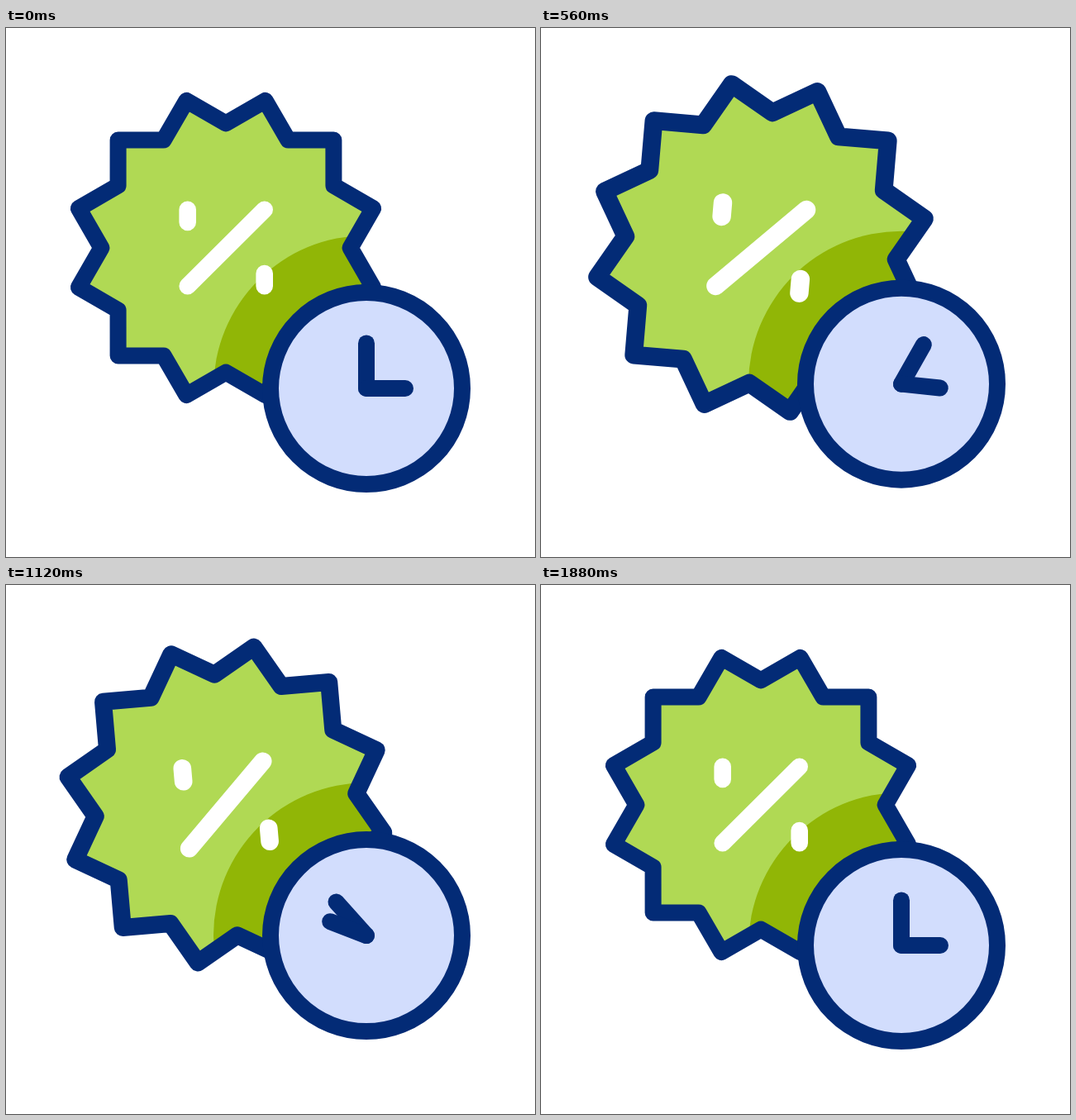
An HTML page with a canvas for the animation above (1.92 s loop, 640 by 640 pixels).

```html
<!DOCTYPE html>
<html lang="en">
<head>
<meta charset="utf-8">
<title>Limited time discount</title>
<style>
html, body { margin: 0; width: 100%; height: 100%; overflow: hidden; background: #fff; }
canvas { display: block; width: 640px; height: 640px; }
</style>
</head>
<body>
<canvas id="stage" width="640" height="640"></canvas>
<script>
const ctx = document.getElementById('stage').getContext('2d');
const NAVY = '#032b76', LIME = '#b0d954', OLIVE = '#91b606', ICE = '#d2ddfd';
const STEP = 40, STEPS = 48, TAU = Math.PI * 2, DEG = Math.PI / 180;

// Symmetric cubic Bezier easing with handles at (0.55, 0) and (0.45, 1)
function ease(u) {
  if (u <= 0) return 0;
  if (u >= 1) return 1;
  let lo = 0, hi = 1, s = 0.5;
  for (let i = 0; i < 30; i++) {
    s = (lo + hi) / 2;
    const r = 1 - s;
    const x = 3 * r * r * s * 0.55 + 3 * r * s * s * 0.45 + s * s * s;
    if (x < u) lo = s; else hi = s;
  }
  return s * s * (3 - 2 * s);
}

// Value at time t along eased [time, value] keys
function track(t, keys) {
  let value = keys[0][1];
  for (let i = 1; i < keys.length; i++) {
    const [t0, v0] = keys[i - 1], [t1, v1] = keys[i];
    if (t >= t0) value = v0 + (v1 - v0) * ease((t - t0) / (t1 - t0));
  }
  return value;
}

const TURN = [[0, 0], [9.6, 6.15], [25.9, -5.2], [37.5, 0]];
const SCALE = [[0, 1], [18.75, 1.1], [37.5, 1]];
const LIFT = [[5.4, 0], [24, 12.8], [42.2, 0]];
const MINUTE = [[7.2, 0], [35.9, 360]];
const HOUR = [[10.1, 90], [44.1, 450]];

const star = new Path2D();
for (let i = 0; i < 24; i++) {
  const r = i % 2 ? 184.4 : 150.6, a = i * 15 * DEG;
  star.lineTo(r * Math.sin(a), -r * Math.cos(a));
}
star.closePath();

const percent = new Path2D('M-46.3 46.3L46.7-46.3M-46.3-46.3V-31M46.7 31V46.3');

function disc(x, y, r) {
  ctx.beginPath();
  ctx.arc(x, y, r, 0, TAU);
}

function placeBadge(t) {
  const k = track(t, SCALE);
  ctx.translate(266, 266);
  ctx.rotate(track(t, TURN) * DEG);
  ctx.scale(k, k);
}

function drawBadge(t, clockY) {
  ctx.save();
  placeBadge(t);
  ctx.fillStyle = LIME;
  ctx.fill(star);
  ctx.clip(star);
  ctx.resetTransform();
  ctx.fillStyle = OLIVE;
  disc(436, clockY, 185);
  ctx.fill();
  ctx.restore();

  ctx.save();
  placeBadge(t);
  ctx.lineWidth = 20;
  ctx.strokeStyle = NAVY;
  ctx.stroke(star);
  ctx.lineWidth = 20.6;
  ctx.strokeStyle = '#fff';
  ctx.stroke(percent);
  ctx.restore();
}

function drawHand(y, length, angle) {
  ctx.beginPath();
  ctx.moveTo(436, y);
  ctx.lineTo(436 + length * Math.sin(angle * DEG), y - length * Math.cos(angle * DEG));
  ctx.stroke();
}

function drawClock(t, y) {
  ctx.lineWidth = 20;
  ctx.strokeStyle = NAVY;
  ctx.fillStyle = ICE;
  disc(436, y, 116);
  ctx.fill();
  ctx.stroke();
  drawHand(y, 54.6, track(t, MINUTE));
  drawHand(y, 47, track(t, HOUR));
}

function draw(now) {
  const t = Math.floor(now / STEP) % STEPS;
  const clockY = 436 - track(t, LIFT);
  ctx.fillStyle = '#fff';
  ctx.fillRect(0, 0, 640, 640);
  ctx.lineCap = ctx.lineJoin = 'round';
  drawBadge(t, clockY);
  drawClock(t, clockY);
}

function loop() {
  draw(performance.now());
  requestAnimationFrame(loop);
}
loop();
</script>
</body>
</html>
```
